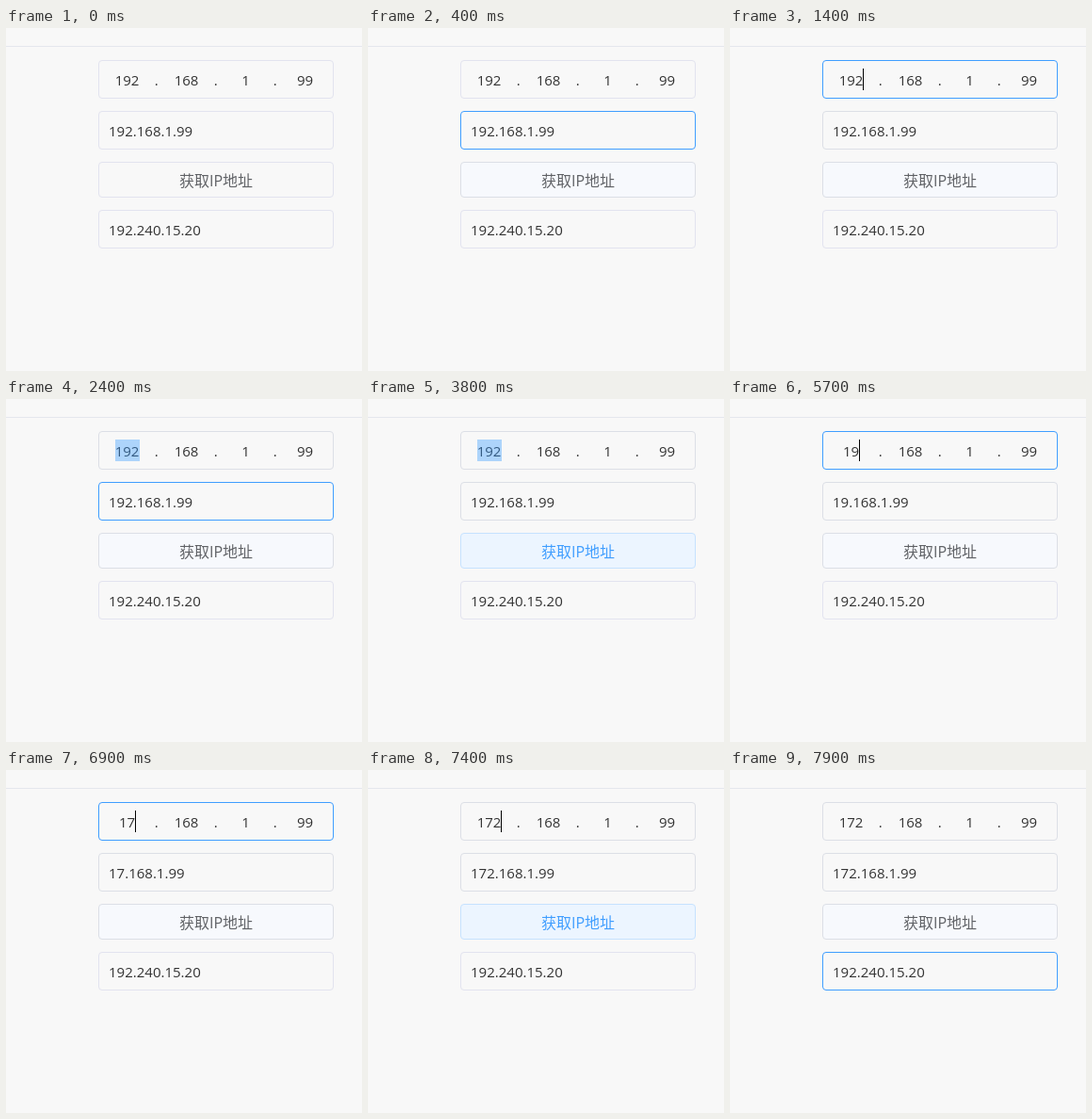
An HTML page for the animation above (8 s loop, 378 by 364 pixels).

```html
<!DOCTYPE html>
<html lang="zh">
<head>
<meta charset="utf-8">
<title>IP input</title>
<style>
  html, body { margin: 0; width: 100%; height: 100%; overflow: hidden; background: #f8f8f8; }
  svg { display: block; }
  text { font: 15px "Open Sans", "Noto Sans", sans-serif; fill: #333; }
  .mid { text-anchor: middle; }
  .box { fill: none; stroke: #e2e3ef; }
  .box.used { stroke: #dcdfe6; }
  .box.on { stroke: #409eff; }
  .btn.used { fill: #f7f9fd; }
  .btn.on { fill: #ecf5ff; stroke: #c6e2ff; }
  .label { font: 16px "Open Sans", "Noto Sans CJK SC", "Noto Sans CJK", sans-serif; fill: #606266; }
  .btn.on + .label { fill: #409eff; }
  #sel { fill: #39f; fill-opacity: .38; }
  #caret { fill: #000; }
</style>
</head>
<body>
<svg width="378" height="364" viewBox="0 0 378 364">
  <rect y="19" width="378" height="1" fill="#e4e7ed"/>
  <rect class="box" x="98.5" y="34.5" width="249" height="40" rx="3.5"/>
  <g id="octets"></g>
  <rect id="sel" y="43" height="23"/>
  <rect id="caret" y="43" width="1" height="23"/>
  <rect class="box" x="98.5" y="88.5" width="249" height="40" rx="3.5"/>
  <text id="value" x="109" y="115"></text>
  <rect class="box btn" x="98.5" y="142.5" width="249" height="37" rx="3.5"/>
  <text class="label mid" x="223" y="168">获取IP地址</text>
  <rect class="box" x="98.5" y="193.5" width="249" height="40" rx="3.5"/>
  <text x="109" y="220">192.240.15.20</text>
</svg>
<script>
const LOOP = 8000, DIGIT = 8.6, MID = 128.4;
const NONE = -1, SEGMENTS = 0, PLAIN = 1, BUTTON = 2, LAST = 3;

const start = { hover: NONE, octet: '192', value: '192', caret: false, sel: 0 };
const steps = [
  [200, { hover: BUTTON }],
  [400, { hover: PLAIN }],
  [800, { hover: NONE }],
  [900, { hover: SEGMENTS }],
  [1400, { caret: true }],
  [1500, { caret: false, sel: 2 }],
  [1600, { sel: 3 }],
  [1800, { hover: NONE }],
  [2400, { hover: PLAIN }],
  [3800, { hover: BUTTON }],
  [4000, { hover: PLAIN }],
  [4200, { hover: NONE }],
  [4300, { hover: SEGMENTS }],
  [4600, { sel: 0, caret: true }],
  [5100, { caret: false }],
  [5600, { caret: true }],
  [5700, { octet: '19', value: '19' }],
  [5900, { octet: '1', value: '1' }],
  [6000, { octet: '' }],
  [6500, { caret: false }],
  [6700, { octet: '1', caret: true }],
  [6900, { octet: '17', value: '17' }],
  [7100, { octet: '172', value: '172' }],
  [7200, { hover: PLAIN }],
  [7400, { hover: BUTTON }],
  [7600, { caret: false }],
  [7700, { hover: NONE }],
  [7900, { hover: LAST }],
];

const $ = id => document.getElementById(id);
const boxes = [...document.querySelectorAll('.box')];

function addText(x, str) {
  const el = document.createElementNS('http://www.w3.org/2000/svg', 'text');
  el.setAttribute('class', 'mid');
  el.setAttribute('x', x);
  el.setAttribute('y', 61);
  el.textContent = str;
  return $('octets').appendChild(el);
}

const [octet] = ['192', '168', '1', '99'].map((s, i) => addText(128.5 + 63 * i, s));
for (let i = 0; i < 3; i++) addText(159.7 + 63 * i, '.');

function show(count) {
  const s = Object.assign({}, start);
  const used = new Set();
  for (const [, change] of steps.slice(0, count)) {
    Object.assign(s, change);
    used.add(s.hover);
  }
  // the second field loses its pristine tint together with the first
  boxes.forEach((box, i) => {
    box.classList.toggle('used', used.has(i));
    box.classList.toggle('on', s.hover === i);
  });
  octet.textContent = s.octet;
  $('value').textContent = s.value + '.168.1.99';

  const end = Math.round(MID + s.octet.length * DIGIT / 2);
  $('caret').setAttribute('x', end);
  $('caret').style.display = s.caret ? '' : 'none';
  const width = Math.ceil(s.sel * DIGIT);
  $('sel').setAttribute('x', end + 1 - width);
  $('sel').setAttribute('width', s.sel ? width + (s.sel === 3 ? 0 : 0) : 0);
}

let shown = -1;
function frame() {
  const t = performance.now() % LOOP;
  const count = steps.filter(([at]) => at <= t).length;
  if (count !== shown) show(shown = count);
  requestAnimationFrame(frame);
}
frame();
</script>
</body>
</html>
```
